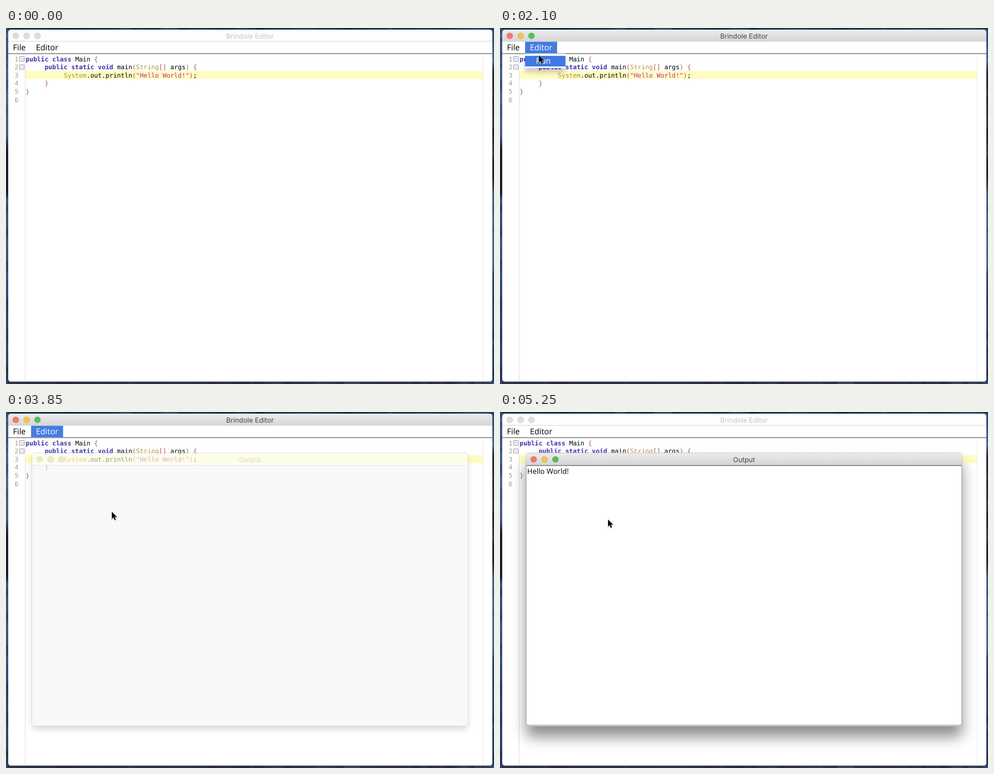
An HTML page for the animation above (5320 ms loop, 876x639 px).

```html
<!DOCTYPE html>
<html lang="en">
<head>
<meta charset="utf-8">
<title>Code editor</title>
<style>
  html, body { margin: 0; width: 100%; height: 100%; overflow: hidden; background: #26344f; }
  svg { display: block; width: 876px; height: 639px; }
  text { text-rendering: geometricPrecision; white-space: pre; }
  .code { font: 11.35px "DejaVu Sans Mono", monospace; }
  .kw { font-weight: bold; fill: #3d2fae; }
  .type { fill: #ac983c; }
  .br { fill: #ad5646; }
  .str { fill: #b53585; }
  .num { fill: #999; text-anchor: end; }
  .menu { font: 14.4px "Open Sans", "Noto Sans", sans-serif; }
  .title { font: 12.3px Inter, Roboto, sans-serif; text-anchor: middle; }
</style>
</head>
<body>
<svg viewBox="0 0 876 639" xmlns="http://www.w3.org/2000/svg">
  <defs>
    <linearGradient id="bar" x2="0" y2="1">
      <stop stop-color="#ececec"/><stop offset="1" stop-color="#d5d5d5"/>
    </linearGradient>
    <linearGradient id="left" x2="0" y2="1">
      <stop stop-color="#344b72"/><stop offset=".12" stop-color="#46618b"/>
      <stop offset=".3" stop-color="#4a5c7f"/><stop offset=".34" stop-color="#20212f"/>
      <stop offset=".45" stop-color="#1b1d29"/><stop offset=".49" stop-color="#38506f"/>
      <stop offset=".75" stop-color="#304b74"/><stop offset="1" stop-color="#2b4162"/>
    </linearGradient>
    <linearGradient id="right" x2="0" y2="1">
      <stop stop-color="#30476e"/><stop offset=".1" stop-color="#405b88"/>
      <stop offset=".13" stop-color="#272a3a"/><stop offset=".42" stop-color="#20202c"/>
      <stop offset=".47" stop-color="#49617f"/><stop offset=".66" stop-color="#4a6484"/>
      <stop offset=".72" stop-color="#2c3f5e"/><stop offset="1" stop-color="#293e60"/>
    </linearGradient>
    <filter id="soft" x="-20%" y="-20%" width="140%" height="150%"><feGaussianBlur stdDeviation="6"/></filter>
    <filter id="wide" x="-20%" y="-20%" width="140%" height="150%"><feGaussianBlur stdDeviation="13"/></filter>
    <filter id="small" x="-30%" y="-60%" width="160%" height="260%"><feGaussianBlur stdDeviation="4"/></filter>
    <clipPath id="frame"><rect x="4" y="3" width="869" height="632" rx="5"/></clipPath>
  </defs>

  <g id="desk">
    <rect width="876" height="639" fill="#1f2d49"/>
    <rect width="438" height="639" fill="url(#left)"/>
    <rect x="438" width="438" height="639" fill="url(#right)"/>
    <rect width="876" height="3" fill="#223759"/>
    <rect x="4" y="634" width="869" height="5" fill="#2b3547"/>
  </g>

  <g clip-path="url(#frame)">
    <rect x="4" y="3" width="869" height="632" fill="#fff"/>
    <g id="mainBar"></g>
    <path d="M4 24H873" stroke="#d6d6d6"/>
    <path d="M4 46H873" stroke="#7c7c7c" stroke-width="1.6"/>
    <rect x="35" y="77" width="821" height="14.6" fill="#fffcc2"/>
    <path d="M34.5 47V633" stroke="#e0e0e0"/>
    <path d="M856.5 47V633" stroke="#e9e9e9"/>
    <path d="M4 634.4H873" stroke="#b9b9b9"/>
    <g id="code" class="code"></g>
    <g fill="#fff" stroke="#8c8c8c" stroke-width=".9">
      <path d="M24.5 51.5h8v8h-8zM26.5 55.5h4M24.5 66.1h8v8h-8zM26.5 70.1h4"/>
    </g>
    <rect id="menuOn" x="45" y="24.6" width="57.5" height="20.6" fill="#447ce0"/>
    <g class="menu">
      <text x="12.6" y="40">File</text>
      <text id="menuText" x="53.8" y="40">Editor</text>
    </g>
  </g>

  <g id="popup" class="menu">
    <rect x="45" y="54" width="72" height="25" opacity=".22" filter="url(#small)"/>
    <rect x="45" y="46" width="72.5" height="26" fill="#fff" opacity=".97"/>
    <rect x="45" y="50" width="72.5" height="19" fill="#4079e2"/>
    <text x="64.6" y="64" fill="#fff">Run</text>
  </g>

  <g id="out">
    <g clip-path="url(#frame)">
      <rect id="softShade" x="47" y="81" width="782" height="489" rx="5" filter="url(#soft)"/>
      <rect id="wideShade" x="47" y="94" width="782" height="489" rx="5" filter="url(#wide)"/>
    </g>
    <rect x="46.5" y="73.5" width="783" height="490" rx="5" fill="#f4f4f4" stroke="#c9c9c9"/>
    <g id="outBar"></g>
    <path id="outLine" d="M47 95.5H829" stroke="#d4d4d4"/>
    <g id="result">
      <rect x="47" y="96.4" width="782" height="465.6" fill="#fff" stroke="#989898"/>
      <path d="M47 96.3H829" stroke="#8a8a8a" stroke-width="1.4"/>
      <text x="48.8" y="110.6" style="font:13.05px 'Open Sans','Noto Sans',sans-serif">Hello World!</text>
    </g>
  </g>

  <g id="cursor">
    <path d="M0 1V13.6L2.9 10.9L4.9 15.6L7 14.7L5 10.2H9Z" opacity=".2" stroke="#000" stroke-width="1.6"/>
    <path d="M0 0V12.8L2.9 10L4.9 14.8L7.1 13.9L5.1 9.3H9Z" stroke="#fff" stroke-width=".9" stroke-linejoin="round" paint-order="stroke"/>
  </g>
</svg>
<script>
const $ = id => document.getElementById(id);
const FRAME = 70, LOOP = 5320;
const show = (id, on) => $(id).setAttribute('visibility', on ? 'visible' : 'hidden');
const ramp = (t, a, b) => Math.min(1, Math.max(0, (t - a) / (b - a)));

// Title bar in both states: active and inactive group
function titleBar(id, x, y, w, h, name) {
  const shape = `M${x} ${y + h}V${y + 5}q0 -5 5 -5H${x + w - 5}q5 0 5 5V${y + h}Z`;
  const cy = y + 11;
  const make = (key, fill, ink, lamps) => `<g id="${id + key}"><path d="${shape}" fill="${fill}"/>` +
    lamps.map((c, i) => `<circle cx="${x + 13.5 + i * 19.5}" cy="${cy}" r="5.6" fill="${c}" stroke="#000" stroke-opacity=".12" stroke-width=".8"/>`).join('') +
    `<text class="title" x="438" y="${cy + 4.5}" fill="${ink}">${name}</text></g>`;
  $(id).innerHTML = make('On', 'url(#bar)', '#484848', ['#f8756a', '#f9c04f', '#54c157']) +
    make('Off', '#fdfdfd', '#c5c5c5', ['#dedede', '#dedede', '#dedede']);
}
titleBar('mainBar', 4, 3, 869, 21, 'Brindole Editor');
titleBar('outBar', 47, 74, 782, 21, 'Output');

function setActive(id, on) {
  show(id + 'On', on);
  show(id + 'Off', !on);
}

// Each token is [column, class, text]
const lines = [
  [[0, 'kw', 'public class'], [13, '', 'Main'], [18, 'br', '{']],
  [[5, 'kw', 'public static void'], [24, '', 'main'], [28, 'br', '('], [29, 'type', 'String'],
   [35, 'br', '[]'], [38, '', 'args'], [42, 'br', ')'], [44, 'br', '{']],
  [[10, 'type', 'System'], [16, '', '.out.println'], [28, 'br', '('],
   [29, 'str', '"Hello World!"'], [43, 'br', ')'], [44, '', ';']],
  [[5, 'br', '}']],
  [[0, 'br', '}']],
  []
];
$('code').innerHTML = lines.map((tokens, i) => {
  const y = 59.5 + i * 14.6;
  return `<text class="num" x="22.4" y="${y}">${i + 1}</text>` + tokens.map(([col, cls, s]) =>
    `<text class="${cls}" x="${35.3 + col * 6.833}" y="${y}">${s}</text>`).join('');
}).join('');

// Rocky mottling on the visible rim of the desktop
let seed = 11;
const rnd = () => (seed = seed * 16807 % 2147483647) / 2147483647;
let specks = '';
for (let i = 0; i < 150; i++) {
  const tone = rnd() < .4 ? '#6d84a5' : '#0d1220';
  const a = (.05 + rnd() * .14).toFixed(2);
  const p = rnd(), len = 5 + rnd() * 18;
  specks += i % 2
    ? `<rect x="${p * 876}" y="${i % 4 > 1 ? 0 : 635}" width="${len * 2}" height="4" fill="${tone}" opacity="${a}"/>`
    : `<rect x="${i % 4 ? 0 : 873}" y="${p * 639}" width="4" height="${len}" fill="${tone}" opacity="${a}"/>`;
}
$('desk').innerHTML += specks;

// Pointer stops: time, x, y
const path = [
  [490, 1, 148], [910, 64, 58], [1050, 64, 58], [1330, 72, 40], [1890, 72, 40],
  [2100, 70, 49], [2310, 75, 58], [2660, 75, 58], [3150, 190, 179],
  [5180, 190, 179], [5250, 194, 193]
];
function pointer(t) {
  let i = 0;
  while (i < path.length - 2 && t >= path[i + 1][0]) i++;
  const [t0, x0, y0] = path[i], [t1, x1, y1] = path[i + 1];
  const u = ramp(t, t0, t1);
  const e = u * u * (3 - 2 * u);
  return [x0 + (x1 - x0) * e, y0 + (y1 - y0) * e];
}

function draw(t) {
  const menuOn = t >= 1820 && t < 4760;
  const outFront = t >= 3990;
  const grow = ramp(t, 3920, 4130);

  show('cursor', t >= 490);
  $('cursor').setAttribute('transform', `translate(${pointer(t)})`);
  setActive('mainBar', t >= 1330 && !outFront);
  show('menuOn', menuOn);
  $('menuText').setAttribute('fill', menuOn ? '#fff' : '#000');
  show('popup', t >= 1890 && t < 2590);

  $('out').setAttribute('display', t >= 3850 ? 'inline' : 'none');
  $('out').setAttribute('opacity', t < 3920 ? .6 : 1);
  setActive('outBar', outFront);
  $('softShade').setAttribute('opacity', .25 * (1 - grow));
  $('wideShade').setAttribute('opacity', .45 * grow);
  $('outLine').setAttribute('stroke', outFront ? '#aaa' : '#d4d4d4');
  show('result', t >= 4760);
}

let start;
function tick(now) {
  if (start === undefined) start = now;
  draw(Math.floor((now - start) % LOOP / FRAME) * FRAME);
  requestAnimationFrame(tick);
}
draw(0);
requestAnimationFrame(tick);
</script>
</body>
</html>
```
